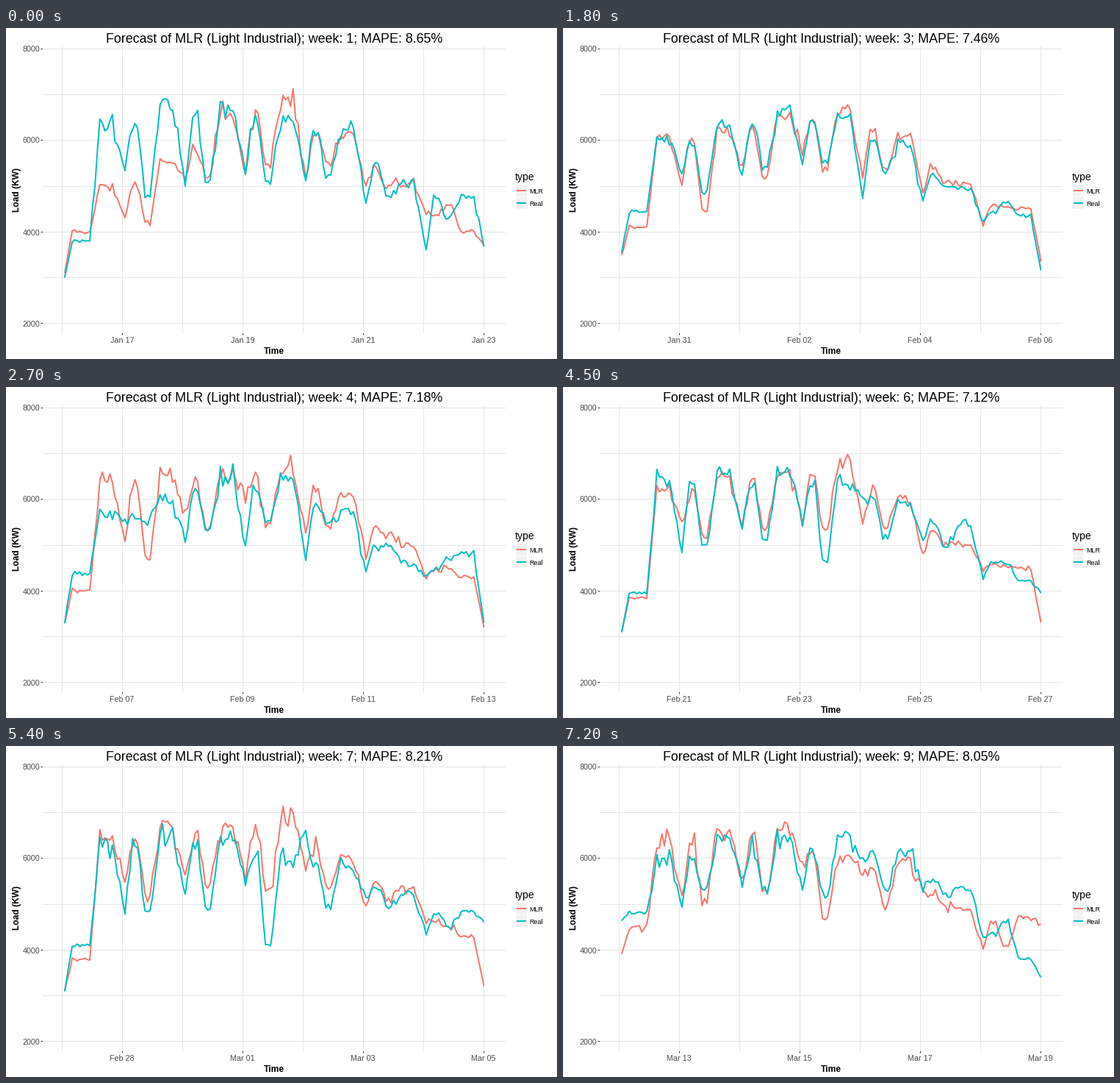
A matplotlib script that plays this animation: 750x450 px, repeating every 8 s.

```python
import numpy as np
import matplotlib.pyplot as plt
from matplotlib.animation import FuncAnimation
from matplotlib.dates import date2num, num2date
from matplotlib.patches import Rectangle

W, H, DPI = 750, 450, 100
RED, TEAL = "#F8766D", "#00BFC4"
GRID, TICK, LABEL = "#E5E5E5", "#333333", "#4D4D4D"
LEFT, RIGHT, TOP, BOTTOM = 50, 680, 25, 415
DAY_W = 82
DAYS_X = [76.5 + DAY_W * i for i in range(8)]
FRAMES, INTERVAL, HOLD = 80, 100, 9
FIRST_DAY = date2num(np.datetime64("2016-01-17"))

plt.rcParams["font.family"] = "Liberation Sans"
rng = np.random.default_rng(16)
hours = np.arange(1, 169)


def load_y(load):
    """Height on the stage of a load in hundreds of kW."""
    return 28.5 + 6.217 * (80 - load)


def week_curve(night, dip, peak):
    """Hourly load from each day's midnight low, morning dip and evening plateau."""
    night, dip, peak = (np.array(v, float) for v in (night, dip, peak))
    early = (peak + np.roll(peak, 1)) / 2 - 2
    early[0] = dip[0]
    start = 24 * np.arange(7)[:, None]
    times = start + np.array([1, 4, 6, 9, 11, 15, 20])
    keys = np.stack([night[:7], early, early, dip, dip, peak, peak], axis=1)
    load = np.interp(hours, np.append(times, 168), np.append(keys, night[7]))
    # Busy hours fluctuate more than quiet ones
    return load + rng.normal(0, 0.0006, hours.size) * (load - 20) ** 2


def blend(a, b):
    return (a[0] + b[0]) / 2, (a[1] + b[1]) / 2


# Weekly error in percent
mape = [8.65, 7.38, 7.46, 7.18, 6.03, 7.12, 8.21, 7.94, 8.05]

# Week number: forecast and measured load, in hundreds of kW
weeks = {
    1: (week_curve([31, 43, 51, 52, 52, 50, 44, 37], [40, 42, 52, 55, 55, 50, 46], [50, 55, 66, 68, 61, 51, 40]),
        week_curve([30, 53, 50, 53, 52, 46, 36, 37], [38, 47, 51, 51, 52, 48, 43], [64, 68, 67, 65, 63, 51, 48])),
    2: (week_curve([37, 50, 51, 54, 51, 50, 40, 35], [42, 42, 50, 53, 54, 50, 46], [58, 59, 66, 67, 61, 51, 47]),
        week_curve([38, 50, 53, 60, 48, 49, 41, 30], [45, 42, 55, 55, 52, 50, 46], [64, 67, 68, 66, 61, 53, 39])),
    4: (week_curve([33, 51, 56, 60, 53, 48, 43, 32], [40, 47, 54, 55, 54, 52, 45], [64, 66, 66, 66, 61, 50, 43]),
        week_curve([33, 54, 51, 49, 47, 44, 43, 33], [44, 56, 54, 55, 55, 50, 47], [57, 60, 65, 65, 57, 46, 48])),
    5: (week_curve([31, 54, 53, 53, 52, 46, 43, 34], [39, 53, 53, 55, 55, 49, 46], [60, 63, 66, 67, 60, 47, 47]),
        week_curve([31, 48, 55, 56, 54, 51, 42, 33], [38, 52, 53, 52, 54, 50, 47], [66, 66, 67, 68, 60, 57, 36])),
    7: (week_curve([31, 54, 55, 56, 57, 49, 46, 32], [38, 52, 54, 53, 54, 51, 45], [65, 67, 67, 68, 60, 54, 43]),
        week_curve([31, 48, 52, 55, 65, 51, 43, 46], [41, 49, 49, 41, 50, 49, 45], [64, 65, 65, 60, 59, 52, 48])),
    9: (week_curve([39, 51, 55, 58, 57, 52, 40, 46], [45, 51, 53, 47, 50, 50, 41], [64, 66, 66, 60, 59, 49, 47]),
        week_curve([46, 50, 53, 53, 59, 53, 43, 34], [48, 53, 53, 52, 53, 52, 46], [60, 65, 64, 64, 62, 53, 38])),
}
for n in (3, 6, 8):
    weeks[n] = blend(weeks[n - 1], weeks[n + 1])

fig = plt.figure(figsize=(W / DPI, H / DPI), dpi=DPI, facecolor="white")
ax = fig.add_axes([0, 0, 1, 1])
ax.set(xlim=(0, W), ylim=(H, 0))
ax.axis("off")


def pt(px):
    return px * 72 / DPI


def segment(xs, ys, color, width=1, z=1):
    return ax.plot(xs, ys, color=color, lw=pt(width), zorder=z, snap=False,
                   solid_capstyle="butt", solid_joinstyle="round")[0]


def write(x, y, text, size, color="black", ha="left", **kw):
    return ax.text(x, y, text, fontsize=pt(size), color=color, ha=ha, va="baseline", **kw)


# Grid and axes
for load in range(20, 81, 10):
    y = np.floor(load_y(load)) + 0.5
    segment([LEFT, RIGHT], [y, y], GRID)
    if load % 20 == 0:
        segment([47.5, LEFT], [y, y], TICK)
        write(46, y + 4, str(load * 100), 10.7, LABEL, "right")
for i, x in enumerate(DAYS_X):
    segment([x, x], [TOP, BOTTOM], GRID)
    if i % 2:
        segment([x, x], [BOTTOM, BOTTOM + 2.5], TICK)
date_labels = [write(x - 0.5, 428, "", 10.7, LABEL, "center") for x in DAYS_X[1::2]]
write(365, 443, "Time", 12, ha="center", weight="bold")
write(18, 220, "Load (KW)", 12, ha="center", weight="bold",
      rotation=90, rotation_mode="anchor")

# Legend
write(693, 207.5, "type", 14)
for top, name, color in ((213, "MLR", RED), (230, "Real", TEAL)):
    ax.add_patch(Rectangle((694, top), 15, 16, fc="#F2F2F2", ec="none"))
    segment([695, 708], [top + 8, top + 8], color, 2, 2)
    write(712, top + 12, name, 9)

title = write(364.8, 20, "", 17.88, ha="center")
mlr_line = segment([], [], RED, 2, 3)
real_line = segment([], [], TEAL, 2, 4)
hours_x = DAYS_X[0] + hours * DAY_W / 24


def draw(frame):
    n = frame // HOLD + 1
    title.set_text(f"Forecast of MLR (Light Industrial); week: {n}; MAPE: {mape[n - 1]:.2f}%")
    for line, load in zip((mlr_line, real_line), weeks[n]):
        line.set_data(hours_x, load_y(load))
    for i, label in enumerate(date_labels):
        day = FIRST_DAY + 7 * (n - 1) + 2 * i
        label.set_text(num2date(day).strftime("%b %d"))
    return [title, mlr_line, real_line, *date_labels]


anim = FuncAnimation(fig, draw, frames=FRAMES, interval=INTERVAL, repeat=True, repeat_delay=0)
plt.show()
```
